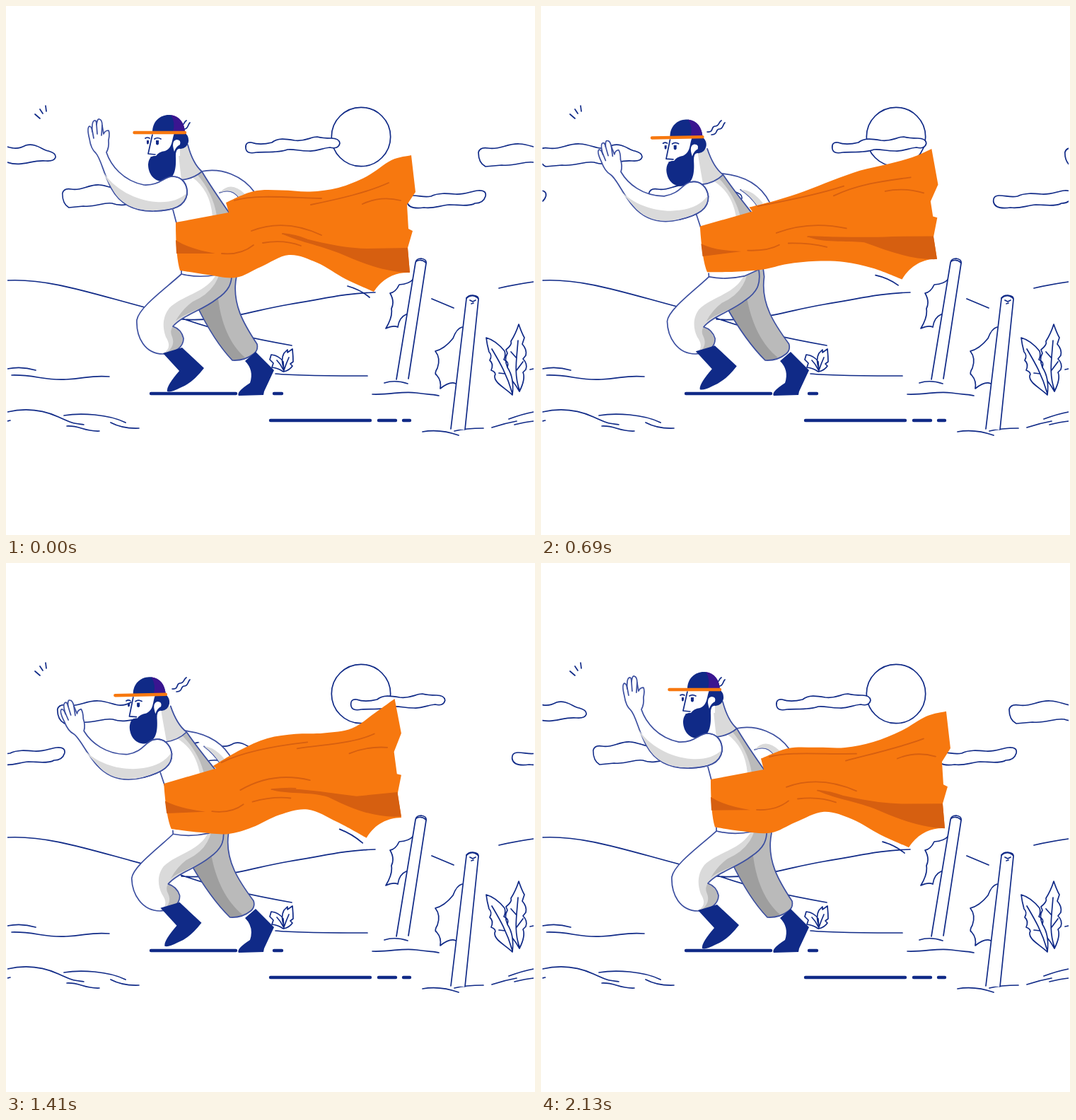
Recreate the animation shown at these times as an HTML page. Size 748x748 px, loop 2.16 s.

```html
<!DOCTYPE html>
<html lang="en">
<head>
<meta charset="utf-8">
<title>Windy day</title>
<style>
  html, body { margin: 0; width: 100%; height: 100%; overflow: hidden; background: #fff; }
  svg { display: block; width: 100%; height: 100%; }
  path, circle { stroke-linecap: round; stroke-linejoin: round; }
  .line { fill: none; stroke: #102a87; stroke-width: 1.7; }
  .shape { fill: #fff; stroke: #102a87; stroke-width: 1.7; }
  .skin { fill: #fff; stroke: #3c4fa0; stroke-width: 1.7; }
  .edge { fill: none; stroke: #3c4fa0; stroke-width: 1.7; }
  .white { fill: #fff; }
  .navy { fill: #102a87; }
  .purple { fill: #3a1590; }
  .light { fill: #dadada; }
  .mid { fill: #bababa; }
  .dark { fill: #9e9e9e; }
  .orange { fill: #f7780f; }
  .rust { fill: #d65f10; }
  .fold { fill: none; stroke: #d65f10; stroke-width: 1.8; }
  .bar { fill: none; stroke: #102a87; stroke-width: 4.4; }
  .brim { fill: none; stroke: #f7780f; stroke-width: 4.4; }
</style>
</head>
<body>
<svg viewBox="0 0 748 748">
  <defs>
    <clipPath id="stage"><path d="M2 0H746V748H2Z"/></clipPath>
    <path id="puff" class="shape" d="M22 207Q24 199 36 201C52 204 62 194 80 195C100 196 108 207 126 197C140 193 150 204 158 205Q169 208 168 214Q166 220 154 219C135 217 120 228 100 221C85 219 75 227 55 225Q44 226 32 227Q22 222 22 207Z"/>
    <path id="wisp" class="shape" d="M608 277Q607 268 616 268C626 268 632 271 642 269C652 264 664 265 676 266C690 267 698 262 708 261Q721 260 719 269Q716 279 704 279C696 284 680 281 668 281C654 282 646 287 632 285Q610 288 608 277Z"/>
    <g id="clouds">
      <path class="shape" d="M339 201Q338 192 347 193C358 197 368 195 376 193C384 186 396 188 408 190C424 192 430 185 440 185C448 187 454 187 460 187Q471 187 472 194Q470 203 458 200C446 201 440 206 428 205C414 205 408 202 398 203C386 208 366 206 354 207Q340 210 339 201Z"/>
      <use href="#puff" x="-98"/>
      <use href="#puff" x="646"/>
      <use href="#puff" transform="translate(60 58) scale(.9 1)"/>
      <use href="#wisp" x="-41"/>
      <use href="#wisp" x="-785"/>
    </g>
  </defs>
  <g clip-path="url(#stage)">
    <circle class="line" cx="502" cy="185" r="41.7"/>
    <use id="nextClouds" href="#clouds"/>
    <use id="nowClouds" href="#clouds"/>
    <path class="line" d="M41 153L48 159M48 146L52 152M56 141L57 149
      M2 388C60 385 120 406 196 426M247 441C285 455 340 469 404 480M248 443C310 447 350 430 400 422S480 406 522 405
      M602 414L633 427M697 399Q718 394 746 390
      M2 513Q22 509 42 515M8 522C40 521 55 530 85 528S120 522 146 524
      M2 574C28 568 52 571 74 581S95 590 110 592M82 579C105 575 145 577 169 589M86 594C105 593 110 602 132 601M148 589Q165 598 188 597M2 587L6 586
      M381 520Q410 523 511 523
      M518 549C545 550 560 544 580 547S605 549 612 551M535 533Q550 528 568 534
      M589 602C605 599 620 600 640 607M634 601Q650 597 675 597
      M687 596Q705 590 722 587M711 584Q730 577 746 574M719 592Q735 588 746 587M741 514L746 513"/>
    <path class="line" d="M392 517Q385 512 376 511L378 505L373 500L375 493Q386 494 392 503L393 517M393 513Q388 500 393 491L398 486V490L405 485Q406 495 406 503L402 506L405 509Q401 515 393 517M393 515Q396 506 400 497M392 514Q388 506 383 501"/>
    <path class="line" d="M716 550C706 540 690 533 691 523Q694 518 686 515Q690 506 684 501Q688 494 683 489Q680 478 679 469Q693 473 705 488Q707 494 704 500Q712 503 709 511Q719 526 716 550M716 548C708 520 697 502 687 485
      M709 511Q704 499 709 491L707 486Q716 479 714 474Q721 463 725 450Q729 462 733 469L730 478Q737 486 735 494L731 499Q738 506 735 514L731 518Q735 527 726 545Q721 536 716 530M726 543C718 520 722 500 724 473M722 515L731 503M722 498L714 489M706 520L697 519"/>
    <path class="shape" d="M575 387Q570 393 556 394Q551 405 543 406Q550 418 545 428Q547 440 537 456Q548 451 554 454Q556 440 566 436"/>
    <path class="shape" d="M552 528L579 363Q580 357 587 357Q595 358 594 364L569 527"/>
    <path class="line" d="M580 361Q587 357 594 363"/>
    <path class="shape" d="M645 454Q637 456 632 470Q620 485 607 488Q615 498 610 512Q605 520 609 522Q616 530 614 541Q628 530 636 534"/>
    <path class="shape" d="M629 598L651 414Q652 409 660 409Q669 410 668 415L649 599"/>
    <path class="line" d="M651 413Q660 406 668 414M656 416L660 418L664 416M658 421L661 420"/>
    <path class="bar" d="M205 548H325M379 548H390M374 586H515M527 586H551M562 586H571"/>
    <path class="line" d="M235 178C245 179 240 170 246 170S251 164 255 162M241 182C251 182 246 174 252 174S257 167 260 165"/>
    <g id="body"></g>
    <path id="frontBoot" class="navy" d="M222 491L249 483L280 512Q263 534 246 540Q233 547 228 545Q226 538 245 516Z"/>
    <path class="navy" d="M353 489L379 515L365 545L364 550L329 551Q325 546 345 533Q351 515 338 502Z"/>
    <g id="cape"></g>
    <g id="head">
      <path class="white" d="M206 180H246V212H208L201 209Z"/>
      <path class="navy" d="M238 180H254Q259 185 258 192Q256 201 247 202Q240 200 240 212C241 232 238 246 222 248C208 248 201 236 201 224Q202 211 212 212Q216 206 225 205C236 200 234 190 238 180Z"/>
      <path class="white" d="M238 206Q233 191 241 189Q248 189 246 196Q240 199 238 206Z"/>
      <path class="line" d="M207 182L201 209L211 210M210 188Q214 185 219 188M197 187Q200 185 203 187M205 214L211 213"/>
      <path class="navy" d="M212 190H216V195Q214 198 212 195ZM199 190H202V194Q200 197 199 194Z"/>
      <path class="navy" d="M207 178C207 163 218 154 230 154S252 163 253 178Z"/>
      <path class="purple" d="M233 154C246 156 252 165 253 178H236Q240 165 233 154Z"/>
      <path class="brim" d="M181.500 179H253"/>
    </g>
    <g id="arm">
      <path class="skin" d="M118 188Q114 172 118 170Q121 170 122 178Q121 163 125 162Q128 161 128 168Q129 159 132 160Q136 161 136 169L138 181Q140 176 145 176Q147 180 145 190Q146 200 142 207C148 225 165 247 195 253C218 254 222 242 235 241C250 241 257 253 256 266C253 283 238 289 210 290C178 291 160 278 149 258C138 238 134 215 127 208Q120 202 118 188Z"/>
      <path class="light" d="M135 231C152 260 185 275 212 277Q240 279 255 265C255 280 240 288 210 289C180 290 160 278 150 258Q141 243 135 231Z"/>
      <path class="edge" d="M122 176L124 187M128 167L129 181M136 169L135 183M235 241C250 241 257 253 256 266C253 283 238 289 210 290"/>
    </g>
  </g>
</svg>
<script>
const LOOP = 2160, STEP = 30, CLOUD_SPEED = 0.1055;
const byId = id => document.getElementById(id);
const clamp = v => Math.max(0, Math.min(1, v));
const mix = (a, b, k) => a + (b - a) * k;

// Rewrites every coordinate pair of an absolute path.
const mapPath = (d, fn) => d.replace(/(-?[\d.]+) (-?[\d.]+)/g,
  (_, x, y) => fn(+x, +y).map(v => v.toFixed(2)).join(" "));

function addPath(parent, cls, d = "") {
  const el = document.createElementNS("http://www.w3.org/2000/svg", "path");
  el.setAttribute("class", cls);
  byId(parent).append(el);
  return { el, d };
}

// The figure leans about the planted foot; its lower part only slides.
function lean(x, y, p) {
  const lift = x > 350 ? 1 : clamp((470 - y) / 150);
  return [x - 0.087 * (550 - y) * p, y + 0.087 * (350 - x) * lift * p];
}

const backArm = addPath("body", "skin");
const backArmShade = addPath("body", "light");
const armPoses = [
  [276, 234, 305, 228, 335, 240, 352, 264, 330, 272, 322, 260, 312, 260, 302, 264],
  [246, 238, 276, 244, 300, 256, 312, 284, 298, 290, 290, 278, 284, 268, 274, 258]
];

const bodyParts = [
  ["mid", "M324 358L326 380C318 420 337 451 355 478Q357 487 350 492Q337 502 320 501C300 480 285 455 270 424L300 358Z"],
  ["dark", "M270 424C285 455 300 480 320 501Q330 502 338 497C318 480 303 450 299 405Z"],
  ["edge", "M325 365L326 382C318 420 337 451 355 478Q357 487 350 492Q337 502 320 501C300 480 285 455 270 424"],
  ["white", "M248 368L248 379C225 400 188 426 185 444C184 468 196 492 222 492C241 491 251 481 251 470Q248 457 236 453C250 437 278 430 297 415C314 404 321 393 319 362Z"],
  ["light", "M298 378C284 406 250 408 231 427C221 440 221 455 226 468Q236 484 222 491C240 491 250 483 250 470Q247 457 236 453C250 437 278 430 297 415C314 404 321 393 319 372Z"],
  ["mid", "M302 378Q294 405 264 418Q250 428 240 445C255 433 280 428 297 415C314 404 321 393 319 372Z"],
  ["mid", "M236 453Q247 457 250 470C250 483 240 490 226 491Q240 481 235 468Q231 459 236 453Z"],
  ["edge", "M248 379C225 400 188 426 185 444C184 468 196 492 222 492C241 491 251 481 251 470Q248 457 236 453C250 437 278 430 297 415C314 404 321 393 319 372"],
  ["white", "M243 360L248 379Q272 385 298 380L320 371L320 358Z"],
  ["edge", "M248 374L248 379Q272 385 298 380L320 371"],
  ["white", "M240 185L257 196C262 215 270 228 277 234Q290 256 316 293L241 308L236 288L232 235Z"],
  ["light", "M243 200L257 196C262 215 270 228 277 234Q262 245 248 246Q245 220 243 200Z"],
  ["light", "M263 242C280 254 290 272 292 298L316 293C302 270 290 258 277 234Z"],
  ["mid", "M271 239C284 254 295 275 298 297L316 293C302 270 290 258 277 234Z"],
  ["edge", "M257 196C262 215 270 228 277 234Q290 256 316 293M277 234Q264 245 246 246M236 288L241 307"]
].map(([cls, d]) => addPath("body", cls, d));

// Cape edges at a few moments of its wave.
const topX = [311, 350, 390, 430, 470, 510, 545, 573];
const bottomX = [246, 285, 325, 360, 400, 440, 480, 520];
const sideX = [579, 567, 569, 575, 568, 571];
const capeKeys = [
  { at: 0, top: [278, 262, 260.5, 262.5, 257, 241, 218, 211], bottom: [374, 380, 384, 369, 352, 363, 386, 404], side: [263, 281, 315, 318, 342, 377] },
  { at: .33, top: [285, 265, 250, 246, 248, 245, 225, 207], bottom: [371, 378, 382, 375, 360, 354, 374, 400], side: [256, 282, 313, 315, 341, 375] },
  { at: .65, top: [282, 275, 265, 252, 240, 233, 226, 216], bottom: [372, 373, 371, 365, 364, 368, 379, 397], side: [267, 290, 311, 313, 340, 371] },
  { at: .86, top: [271, 262, 262, 255, 237, 221, 212, 205], bottom: [372, 376, 372, 357, 351, 359, 377, 395], side: [258, 281, 306, 309, 333, 367] }
];
const rest = capeKeys[0];
capeKeys.push({ ...rest, at: 1 });

const capeShape = addPath("cape", "orange");
const capeParts = [
  ["rust", "M390 322C425 328 465 342 510 343L568 342L571 377C535 376 505 364 470 349C445 339 410 332 390 322Z"],
  ["rust", "M240 331C255 341 275 346 296 350L241 350Z"],
  ["fold", "M323 275C352 266 400 271 446 272M431 281C470 273 510 264 541 250M504 280Q530 268 558 275"],
  ["fold", "M347 318C378 306 412 308 446 324M363 335Q393 330 417 339M305 350C325 352 340 346 350 338M391 322Q410 324 425 330"],
  ["line", "M483 396Q501 401 514 412"]
].map(([cls, d]) => addPath("cape", cls, d));

function capeAt(phase) {
  const i = capeKeys.findIndex(k => k.at > phase), a = capeKeys[i - 1], b = capeKeys[i];
  const k = (phase - a.at) / (b.at - a.at);
  const blend = name => a[name].map((v, j) => mix(v, b[name][j], k));
  return { top: blend("top"), bottom: blend("bottom"), side: blend("side") };
}

function sample(xs, ys, x) {
  if (x <= xs[0]) return ys[0];
  const i = xs.findIndex(v => v >= x);
  if (i < 0) return ys[ys.length - 1];
  return mix(ys[i - 1], ys[i], (x - xs[i - 1]) / (xs[i] - xs[i - 1]));
}

// Catmull-Rom curve, continuing from the first point.
function spline(pts) {
  let d = "";
  for (let i = 0; i < pts.length - 1; i++) {
    const p0 = pts[i - 1] || pts[i], p1 = pts[i], p2 = pts[i + 1], p3 = pts[i + 2] || p2;
    const c1 = p1.map((v, j) => v + (p2[j] - p0[j]) / 6);
    const c2 = p2.map((v, j) => v - (p3[j] - p1[j]) / 6);
    d += `C${c1.join(" ")} ${c2.join(" ")} ${p2.join(" ")}`;
  }
  return d;
}

function drawCape(phase, p) {
  const { top, bottom, side } = capeAt(phase);
  const zip = (xs, ys) => xs.map((x, i) => [x, ys[i]]);
  const upper = zip(topX, top), lower = zip(bottomX, bottom).reverse();
  const corner = side[5], tip = bottom[7];
  const beltLeft = 306 - 2 * p, beltRight = 292 - 5 * p;
  const outline = `M240 ${beltLeft}L315 ${beltRight}L${upper[0].join(" ")}${spline(upper)}`
    + zip(sideX, side).map(pt => "L" + pt.join(" ")).join("")
    + `C552 ${corner - 1} 533 ${mix(corner, tip, .25)} 520 ${tip}${spline(lower)}Q240 355 240 ${beltLeft}Z`;
  const toStage = (x, y) => lean(x, y, p);
  capeShape.el.setAttribute("d", mapPath(outline, toStage));

  const ripple = (x, y) => {
    const t0 = sample(topX, rest.top, x), b0 = sample(bottomX, rest.bottom, x);
    const dTop = x < 311 ? 0 : sample(topX, top, x) - t0;
    const dBottom = sample(bottomX, bottom, x) - b0;
    return toStage(x, y + mix(dTop, dBottom, clamp((y - t0) / (b0 - t0))));
  };
  for (const { el, d } of capeParts) el.setAttribute("d", mapPath(d, ripple));
}

function drawBackArm(p) {
  const a = armPoses[0].map((v, i) => mix(v, armPoses[1][i], p).toFixed(2));
  const pt = i => a[2 * i] + " " + a[2 * i + 1];
  backArm.el.setAttribute("d", `M${pt(0)}C${pt(1)} ${pt(2)} ${pt(3)}L${pt(4)}C${pt(5)} ${pt(6)} ${pt(7)}`);
  const midX = mix(338, 304, p), midY = mix(266, 284, p);
  backArmShade.el.setAttribute("d",
    `M${pt(7)}Q${mix(318, 290, p)} ${mix(246, 264, p)} ${midX} ${midY}L${pt(4)}C${pt(5)} ${pt(6)} ${pt(7)}Z`);
}

function drawClouds(t) {
  const place = (id, shift, opacity) => {
    byId(id).setAttribute("transform", `translate(${shift.toFixed(2)} 0)`);
    byId(id).setAttribute("opacity", clamp(opacity));
  };
  place("nowClouds", CLOUD_SPEED * t, (1980 - t) / 220);
  place("nextClouds", CLOUD_SPEED * (t - 2187), (t - 1620) / 220);
}

function draw(t) {
  const p = (1 - Math.cos(2 * Math.PI * t / LOOP)) / 2;
  drawClouds(t);
  drawBackArm(p);
  for (const { el, d } of bodyParts) el.setAttribute("d", mapPath(d, (x, y) => lean(x, y, p)));
  drawCape(t / (LOOP / 2) % 1, p);
  byId("frontBoot").setAttribute("transform", `translate(${-4.5 * p} ${-4 * p})`);
  byId("head").setAttribute("transform", `translate(${-34 * p} ${9.4 * p}) rotate(${-1.5 * p} 225 200)`);
  byId("arm").setAttribute("transform", `translate(${-27 * p} ${10.5 * p}) rotate(${-16.4 * p} 235 265)`);
}

const start = performance.now();
function tick() {
  const t = (performance.now() - start) % LOOP;
  draw(Math.floor(t / STEP) * STEP);
  requestAnimationFrame(tick);
}
tick();
</script>
</body>
</html>
```
